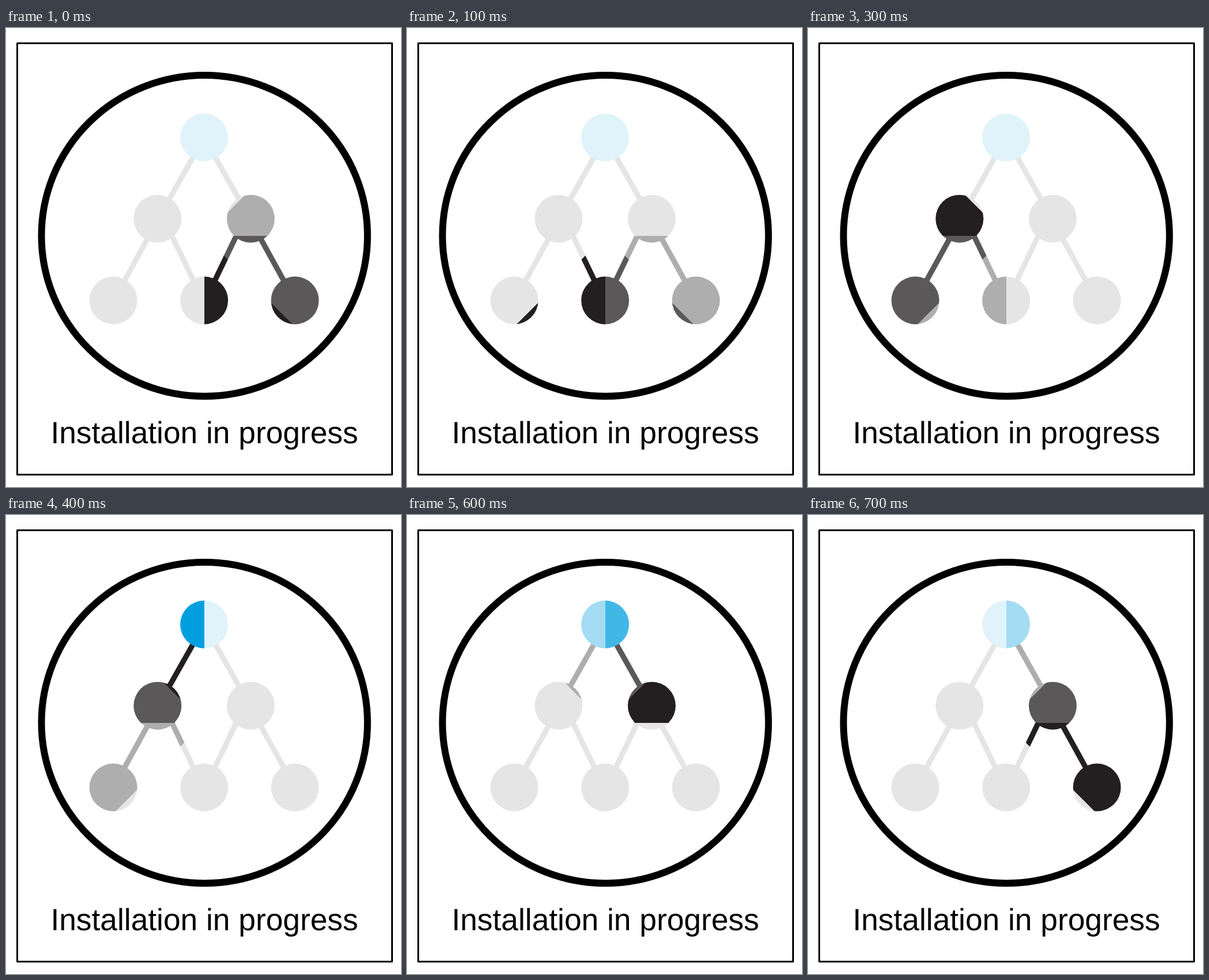
Animation, 685 px wide and 797 px high, one loop 0.8 s. Source, as an HTML page with a canvas:

```html
<!DOCTYPE html>
<html lang="en">
<head>
<meta charset="utf-8">
<title>Installation in progress</title>
<style>
  html, body { margin: 0; width: 100%; height: 100%; overflow: hidden; background: #fff; }
  canvas { display: block; }
</style>
</head>
<body>
<canvas id="stage" width="685" height="797"></canvas>
<script>
const ctx = document.getElementById('stage').getContext('2d');
const MID = 343.6, HUB_Y = 361;
const TOP = 190, ROW = 331.2, BASE = 473;   // heights of the three tree levels
const STEP = 100, STEPS = 8;

// idle, light, mid, head
const GREYS = ['#e5e5e5', '#aeaeae', '#5b5859', '#231f20'];
const BLUES = ['#e0f3fb', '#a3dcf3', '#41b7e6', '#00a0e0'];

// Sectors of 45 degrees that turn clockwise around the hub
function sweep(step, colors) {
  const start = -90 + 45 * step;
  const paint = ctx.createConicGradient(start * Math.PI / 180, MID, HUB_Y);
  const ring = [...colors, colors[0]];
  paint.addColorStop(0, ring[0]);
  for (let i = 0; i < colors.length; i++) {
    const edge = (i + 1) / 8;
    paint.addColorStop(edge, ring[i]);
    paint.addColorStop(edge, ring[i + 1]);
  }
  return paint;
}

function disc(dx, y) {
  ctx.beginPath();
  ctx.arc(MID + dx, y, 41.5, 0, 2 * Math.PI);
  ctx.fill();
}

function link(dx1, y1, dx2, y2) {
  ctx.beginPath();
  ctx.moveTo(MID + dx1, y1);
  ctx.lineTo(MID + dx2, y2);
  ctx.stroke();
}

function drawSign() {
  ctx.strokeStyle = ctx.fillStyle = '#000';
  ctx.lineJoin = 'round';
  ctx.lineWidth = 3;
  ctx.strokeRect(19.5, 26.5, 650, 749);
  ctx.lineWidth = 12;
  ctx.beginPath();
  ctx.ellipse(344.2, 360.7, 282.7, 278.7, 0, 0, 2 * Math.PI);
  ctx.stroke();
  ctx.font = '53.3px "Liberation Sans", Arial, sans-serif';
  ctx.textRendering = 'geometricPrecision';
  ctx.fillText('Installation in progress', 77.4, 721);
}

function drawTree(step) {
  ctx.fillStyle = ctx.strokeStyle = sweep(step, GREYS);
  ctx.lineWidth = 9.4;
  for (const side of [-1, 1]) {
    link(0, TOP, side * 79.5, ROW);
    link(side * 79, ROW, side * 157, BASE);
    link(side * 70, ROW, side * 2, BASE);
    disc(side * 80.8, ROW);
    disc(side * 157.5, BASE);
  }
  disc(0, BASE);
  ctx.fillStyle = sweep(step, BLUES);
  disc(0, TOP);
}

function frame(now) {
  ctx.fillStyle = '#fff';
  ctx.fillRect(0, 0, 685, 797);
  drawSign();
  drawTree(Math.floor(now / STEP) % STEPS);
  requestAnimationFrame(frame);
}
requestAnimationFrame(frame);
</script>
</body>
</html>
```
